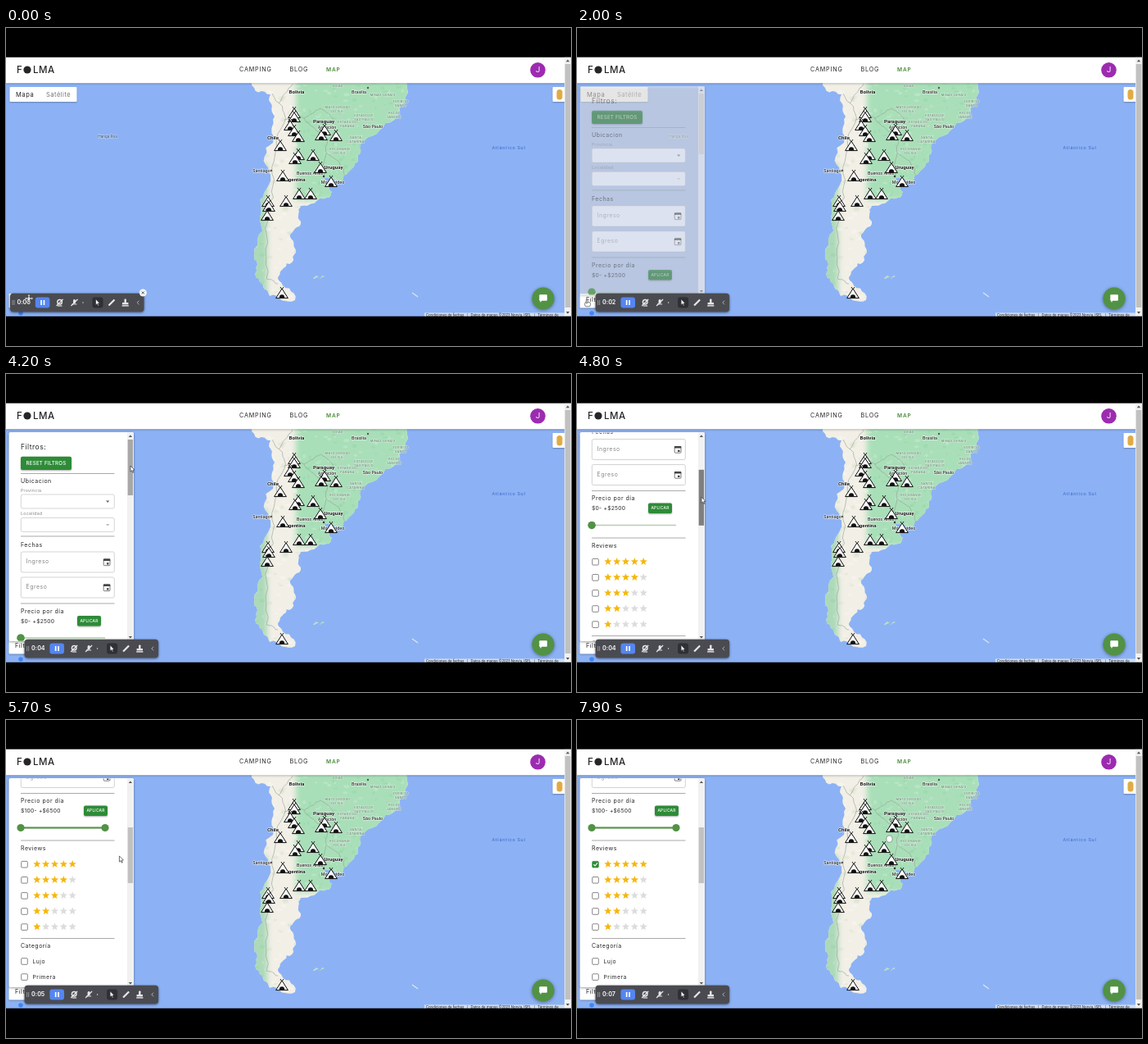
An HTML page with a canvas for the animation above (8000 ms loop, 690 by 388 pixels).

```html
<!DOCTYPE html>
<html lang="es">
<head>
<meta charset="utf-8">
<title>Mapa de campings</title>
<style>
html, body { margin: 0; width: 100%; height: 100%; overflow: hidden; background: #000; }
canvas { display: block; }
</style>
</head>
<body>
<canvas id="stage" width="690" height="388"></canvas>
<script>
const W = 690, H = 388, LOOP = 8000, TOP = 35.6, BOTTOM = 351.7;
const GREEN = '#2e8b37', LEAF = '#529245', INK = '#262626', GREY = '#858585';
const UI = 'Inter, sans-serif', MAP = 'Roboto, sans-serif';
const stage = document.getElementById('stage').getContext('2d');
let c = stage;
let seed = 11;
const random = () => (seed = seed * 16807 % 2147483647) / 2147483647;

// ---- drawing helpers ----
function rect(x, y, w, h, fill, r = 0, stroke) {
  c.beginPath();
  c.roundRect(x, y, w, h, r);
  if (fill) { c.fillStyle = fill; c.fill(); }
  if (stroke) { c.strokeStyle = stroke; c.lineWidth = 0.7; c.stroke(); }
}
function disc(x, y, r, fill, ry = r) {
  c.beginPath();
  c.ellipse(x, y, r, ry, 0, 0, 7);
  c.fillStyle = fill;
  c.fill();
}
function trace(points, close) {
  c.beginPath();
  for (let i = 0; i < points.length; i += 2) c.lineTo(points[i], points[i + 1]);
  if (close) c.closePath();
}
function poly(points, fill, stroke, width = 1) {
  trace(points, true);
  c.fillStyle = fill;
  c.fill();
  if (stroke) { c.strokeStyle = stroke; c.lineWidth = width; c.stroke(); }
}
function line(points, color, width = 1) {
  trace(points);
  c.strokeStyle = color;
  c.lineWidth = width;
  c.stroke();
}
function triangle(x, y, w, h, fill) {
  poly([x - w / 2, y, x + w / 2, y, x, y + h], fill);
}
function text(s, x, y, size, color, { weight = 400, gap = 0, align = 'left', font = UI, halo } = {}) {
  c.font = `${weight} ${size}px ${font}`;
  c.letterSpacing = gap + 'px';
  c.textAlign = align;
  c.textBaseline = 'middle';
  s.split('\n').forEach((row, i) => {
    const rowY = y + i * size * 1.25;
    if (halo) {
      c.strokeStyle = halo;
      c.lineWidth = 1.4;
      c.lineJoin = 'round';
      c.strokeText(row, x, rowY);
    }
    c.fillStyle = color;
    c.fillText(row, x, rowY);
  });
}
function scoped(draw) {
  c.save();
  draw();
  c.restore();
}
function at(x, y, draw) {
  scoped(() => { c.translate(x, y); draw(); });
}
function shadow(color, blur, draw) {
  scoped(() => {
    c.shadowColor = color;
    c.shadowBlur = blur;
    c.shadowOffsetY = 1;
    draw();
  });
}

// Eased progress of t from a to b, 0..1
function ease(t, a, b) {
  const k = Math.min(1, Math.max(0, (t - a) / (b - a)));
  return k * k * (3 - 2 * k);
}

// Splits every segment and nudges the midpoint sideways, for natural coasts and borders
function rough(points, rounds = 3, amount = 0.22) {
  for (; rounds > 0; rounds--) {
    const out = [];
    for (let i = 0; i < points.length - 2; i += 2) {
      const [x, y, nx, ny] = points.slice(i, i + 4), k = (random() - 0.5) * amount * 2;
      out.push(x, y, (x + nx) / 2 + (ny - y) * k, (y + ny) / 2 - (nx - x) * k);
    }
    points = out.concat(points.slice(-2));
  }
  return points;
}

// ---- map ----
const COAST = [300,66, 323,81, 328,108, 326,140, 320,176, 315,202, 310,235, 303,282, 310,310, 322,327,
  353,332, 333,308, 339,293, 354,274, 347,255, 360,236, 360,217, 392,207, 398,200, 388,184,
  410,188, 430,163, 438,137, 474,112, 489,66];
const REGIONS = [['GOIÁS', 405, 71], ['MINAS GERAIS', 460, 82], ['ESPÍRITO\nSANTO', 482, 90],
  ['MATO GROSSO\nDO SUL', 405, 97], ['ESTADO DE\nSÃO PAULO', 437, 107], ['RIO DE\nJANEIRO', 474, 104],
  ['ESTADO DO\nPARANÁ', 417, 115], ['SANTA\nCATARINA', 427, 134], ['RIO GRANDE\nDO SUL', 408, 148]];
const COUNTRIES = [['Bolivia', 355, 78], ['Paraguay', 388, 114], ['Chile', 326, 134],
  ['Uruguay', 400, 170], ['Argentina', 352, 185]];
const CITIES = [['Brasília', 431, 78], ['São Paulo', 448, 120], ['Asunción', 392, 121],
  ['Santiago', 312, 174], ['Buenos Aires', 371, 177], ['Montevideo', 399, 188]];
// Camp groups: first spot, then count and step
const CAMPS = [[352, 104, 2, 0, 5], [347, 119, 3, 5, 7], [335, 144], [389, 125, 2, -4, 6], [403, 132],
  [375, 156], [357, 155, 2, -4, 5], [384, 171], [338, 181], [397, 188], [358, 203, 2, 14, 0],
  [342, 212], [320, 212, 2, 1, 6], [319, 229], [337, 324]];

function tent(x, y) {
  at(x, y, () => {
    line([-2, -8, 0, -5, 2, -8], '#111', 0.9);
    poly([0, -6, 7.4, 5.6, -7.4, 5.6], '#fff', '#111', 1);
    c.beginPath();
    c.ellipse(0, 5.6, 3.3, 4.4, 0, Math.PI, 0);
    c.fillStyle = '#111';
    c.fill();
  });
}

function terrain() {
  c.save();
  trace(rough(COAST), true);
  c.fillStyle = '#f2efe6';
  c.fill();
  c.clip();
  c.filter = 'blur(3px)';
  rect(354, 60, 140, 150, '#a9dfb8');
  rect(290, 165, 29, 175, '#add9b8');
  c.filter = 'none';
  c.globalAlpha = 0.35;
  for (let i = 0; i < 420; i++) {
    const x = 300 + random() * 190, y = 66 + random() * 267;
    const green = (x > 356 && y < 208) || (x < 320 && y > 165);
    const shades = green ? ['#d3efd9', '#8ad3a0'] : ['#fbfaf5', '#cfdcc4'];
    disc(x, y, 0.8 + random() * 3, shades[i % 2], 0.6 + random() * 2);
  }
  c.globalAlpha = 1;
  const border = (points, color = '#93a096') => line(rough(points, 3, 0.15), color, 0.6);
  border([325,80, 340,115, 325,178, 320,235, 318,306, 332,312]);
  border([333,92, 350,68]);
  border([340,112, 364,110, 384,98, 401,115, 388,130, 364,110]);
  border([401,127, 391,152, 389,183]);
  border([391,152, 414,181]);
  border([391,108, 430,96, 482,98], '#bdd6c4');
  border([401,120, 441,122], '#bdd6c4');
  c.restore();
}

function drawMap() {
  rect(0, 67, W, 285, '#8cb2f5');
  terrain();
  for (const x of [378, 386]) poly(rough([x - 3, 305, x, 302, x + 4, 303, x - 3, 306]), '#c4e0c4');
  line([496, 323, 503, 328], '#dfe6ee', 1.2);
  disc(442, 73, 1.2, '#555');
  disc(324, 174, 1.2, '#555');
  disc(388, 181, 1.2, '#333');
  const center = { align: 'center', font: MAP };
  const labels = (list, size, color, style) =>
    list.forEach(([s, x, y]) => text(s, x, y, size, color, { ...center, ...style }));
  labels(REGIONS, 4.1, '#70817a', { gap: 0.25, halo: '#d5eedbaa' });
  labels(CITIES, 5.4, '#333', { weight: 500, halo: '#ffffffaa' });
  labels(COUNTRIES, 6.2, '#1d1d1d', { weight: 600, halo: '#ffffffaa' });
  text('Hanga Roa', 124, 132.5, 4.8, '#44536d', { ...center, halo: '#b8cff6' });
  text('Atlántico Sul', 614, 146, 5.6, '#3c68c4', { ...center, gap: 0.75 });
  for (const [x, y, n = 1, dx, dy] of CAMPS)
    for (let i = 0; i < n; i++) tent(x + (i && dx * i), y + (i && dy * i));
  disc(18, 348, 2.8, '#4285f4');
  rect(511, 347.5, 172, 5, '#e4e9f1cc');
  text('Condiciones de fechas   |   Datos de mapas ©2023 Norvia, ISEL   |   Términos de', 513, 350.3, 4.6, '#333', { font: MAP });
}

// ---- page chrome ----
function header() {
  shadow('#0006', 3, () => rect(0, TOP, W, 67.3 - TOP, '#fff'));
  const word = { weight: 500, gap: 0.5 };
  text('F', 13, 51.3, 11.5, INK, word);
  disc(26, 51, 4.6, INK);
  text('LMA', 33, 51.3, 11.5, INK, word);
  text('CAMPING', 285, 51.2, 7.2, INK, { gap: 0.85 });
  text('BLOG', 346.5, 51.2, 7.2, INK, { gap: 0.85 });
  text('MAP', 391, 51.2, 6.6, '#4b8a38', { weight: 600, gap: 0.8 });
  disc(649.5, 51.3, 9.3, '#9c2bb0');
  text('J', 649.5, 51.7, 9.5, '#fff', { align: 'center', font: MAP });
}

function controls() {
  shadow('#0004', 2, () => {
    rect(4.5, 72, 82, 18, '#fff', 1);
    rect(667.5, 72, 20, 18, '#fff', 1);
  });
  text('Mapa', 12, 81.3, 7.5, '#222', { gap: 0.6 });
  text('Satélite', 49, 81.3, 7.5, '#707070', { gap: 0.5 });
  rect(672.5, 75, 7, 12.5, '#e0ab45', 3.5);
  shadow('#0006', 4, () => disc(656, 330, 13.6, LEAF));
  rect(651.3, 325.3, 9.6, 7.4, '#fff', 1);
  triangle(653, 331, 3.4, 4, '#fff');
}

// Vertical scrollbar with arrows at both ends
function scrollbar(x, y, w, h, thumbY, thumbH, color) {
  rect(x, y, w, h, '#f1f1f1');
  rect(x + 0.7, thumbY, w - 1.4, thumbH, color);
  triangle(x + w / 2, y + 5.6, 4.4, -2.6, '#555');
  triangle(x + w / 2, y + h - 5.6, 4.4, 2.6, '#555');
}

function buildBase() {
  const canvas = document.createElement('canvas');
  canvas.width = W;
  canvas.height = H;
  c = canvas.getContext('2d');
  drawMap();
  header();
  controls();
  scrollbar(682, TOP, 8, BOTTOM - TOP, 44, 297, '#c1c1c1');
  rect(0, 0, W, TOP, '#000');
  rect(0, BOTTOM, W, H - BOTTOM, '#000');
  return canvas;
}
const base = buildBase();

// ---- filter panel ----
function rule(y) { line([18, y, 132.5, y], '#959595', 0.8); }
function heading(s, y) { text(s, 18, y, 7, INK, { gap: 0.5 }); }
function select(label, y, color) {
  text(label, 18, y - 13.3, 5.2, GREY, { gap: 0.3 });
  rect(18.3, y - 8.5, 114, 17, '#fff', 2, '#c4c4c4');
  triangle(124.2, y - 1, 4.4, 2.4, color);
}
function dateField(label, y) {
  rect(18.3, y - 12.5, 114, 25, '#fff', 2, '#c0c0c0');
  text(label, 24.5, y - 0.3, 6.9, GREY, { gap: 0.55 });
  rect(119.2, y - 3.6, 7.8, 7.8, null, 1, '#444');
  rect(119, y - 4, 8.2, 2.4, '#444');
  rect(123, y + 0.8, 2.5, 2.2, '#444');
}
function button(label, x, y, w, h, size) {
  shadow('#0005', 2, () => rect(x, y, w, h, GREEN, 2));
  text(label, x + w / 2, y + h / 2, size, '#fff', { weight: 500, align: 'center', gap: 0.2 });
}
function star(x, y, fill) {
  const points = [];
  for (let i = 0; i < 10; i++) {
    const a = i * Math.PI / 5 - Math.PI / 2, r = i % 2 ? 2.1 : 4.9;
    points.push(x + r * Math.cos(a), y + r * Math.sin(a));
  }
  poly(points, fill);
}
function checkbox(y, on) {
  rect(18.7, y - 3.8, 7.6, 7.6, on ? GREEN : '#fff', 1, on ? GREEN : '#555');
  if (on) line([20.3, y, 22, y + 1.8, 25, y - 1.8], '#fff', 1.1);
}

function content(t) {
  const loaded = t >= 5100;
  text('Filtros:', 18, 89.7, 8.5, INK, { gap: 0.5 });
  button('RESET FILTROS', 18, 100.7, 62, 16.3, 6.2);
  rule(121.5);
  heading('Ubicacion', 130.8);
  select('Provincia', 155.5, '#666');
  select('Localidad', 184, '#bbb');
  rule(198);
  heading('Fechas', 208.7);
  dateField('Ingreso', 229.5);
  dateField('Egreso', 260.5);
  rule(280);
  heading('Precio por día', 289.8);
  text(loaded ? '$100- +$6500' : '$0- +$2500', 18, 301.5, 6.7, INK, { gap: 0.25 });
  button('APLICAR', loaded ? 95 : 87, 295, 29, 12.5, 4.9);

  const high = 18 + 103 * ease(t, 5100, 5300);
  line([18, 322, 121, 322], '#b4d0b0', 1.5);
  line([18, 322, high, 322], LEAF, 2);
  disc(18, 322, 4.6, LEAF);
  disc(high, 322, 4.6, LEAF);

  rule(337.5);
  heading('Reviews', 347.8);
  for (let row = 0; row < 5; row++) {
    const y = 366.7 + row * 19.1;
    checkbox(y, row === 0 && t >= 6900);
    for (let i = 0; i < 5; i++) star(37.8 + i * 10.85, y - 0.3, i < 5 - row ? '#f5b60d' : '#dcdcdc');
  }
  rule(457);
  heading('Categoría', 466);
  ['Lujo', 'Primera', 'Segunda'].forEach((s, i) => {
    const y = 485 + i * 19.1;
    checkbox(y, false);
    text(s, 32.5, y, 6.8, INK, { gap: 0.5 });
  });
}

const scrollAt = t => 198 * ease(t, 4200, 5150) - 7.5 * ease(t, 5250, 5500);

function panel(t) {
  const scroll = scrollAt(t);
  c.save();
  c.globalAlpha = ease(t, 1850, 2150);
  shadow('#0006', 3, () => rect(3.5, 71, 152.5, 255, '#fff', 2));
  scoped(() => {
    c.beginPath();
    c.rect(3.5, 71.5, 144.5, 254);
    c.clip();
    at(0, -scroll, () => content(t));
  });
  const hovered = t > 3800 && t < 5500, dragged = hovered && t > 4250;
  scrollbar(148, 71.5, 7.8, 254, 80 + scroll * 0.268, t < 3700 ? 74 : 68,
    dragged ? '#7f7f7f' : hovered ? '#a8a8a8' : '#c1c1c1');
  c.restore();
}

// ---- recorder toolbar ----
function toolbar(t) {
  const pale = '#e8e8ea';
  at(5 + 13.5 * ease(t, 50, 900) + 4.1 * ease(t, 1100, 1400), 335, () => {
    shadow('#0008', 3, () => rect(0, -11.3, 163.5, 22.6, '#4a4b51', 4));
    for (const x of [3, 5]) line([x, -3, x, 3], '#999', 0.9);
    text('0:0' + Math.floor(t / 1000), 8.5, 0, 7.2, '#fff', { weight: 600 });
    rect(30.8, -6.5, 17.6, 13, '#5586f0', 3);
    for (const x of [37.2, 40.6]) rect(x, -3, 1.7, 6, '#fff');

    // camera and microphone, both struck out
    disc(60.6, -0.7, 3.5, pale);
    disc(60.6, -0.7, 2, '#4a4b51');
    line([58, 4, 63.5, 4], pale, 1.2);
    rect(77, -4, 3, 5.4, pale, 1.5);
    line([75.5, 2, 81.5, 2], pale, 0.9);
    for (const x of [60.6, 78.5]) line([x - 4, 4, x + 4, -4], pale, 1.2);
    disc(89, 0, 0.7, pale);

    // pointer, pen, stamp, collapse
    rect(100.5, -6.5, 13, 13, '#2f3035', 3);
    at(104.5, -4.2, () => CURSORS.arrow());
    line([120.5, 3.5, 127.5, -3.5], pale, 2.2);
    rect(139.5, -4.5, 2.4, 5, pale, 1);
    rect(137, 0, 7.4, 2.4, pale);
    rect(136.6, 3.2, 8.2, 1.4, pale);
    line([157.5, -2.3, 155.2, 0, 157.5, 2.3], '#bbb', 0.9);

    if (t < 1500) {
      disc(162.3, -12, 4.5, '#f4f4f4');
      for (const s of [-1.5, 1.5]) line([160.8, -12 - s, 163.8, -12 + s], '#444', 0.9);
    }
  });
}

// ---- mouse ----
const CURSORS = {
  move() {
    for (let i = 0; i < 4; i++) {
      c.rotate(Math.PI / 2);
      line([0, 0, 4, 0], '#fff', 1.2);
      poly([3, -1.9, 5.3, 0, 3, 1.9], '#fff', '#333', 0.5);
    }
  },
  arrow() {
    poly([0, 0, 0, 7.2, 1.7, 5.7, 2.9, 8.3, 4, 7.8, 2.9, 5.3, 5, 5.1], '#fff', '#333', 0.7);
  },
  pointer() {
    rect(-2.4, 3.4, 6.8, 5.4, '#fff', 2, '#444');
    rect(-0.8, 0, 1.8, 5, '#fff', 0.9, '#444');
  },
  grab() {
    rect(-3.5, -4, 7, 8.2, '#fff', 3, '#777');
  }
};

// Each move: start, end, destination
const MOVES = [[0, 900, 25.5, 334], [1250, 1800, 12, 331], [2350, 2850, 111, 120],
  [3300, 4000, 152, 112], [5500, 6500, 22.5, 174], [6950, 7850, 381.5, 145]];

function mouse(t) {
  let x = 28, y = 330;
  for (const [from, to, nx, ny] of MOVES) {
    const k = ease(t, from, to);
    x += (nx - x) * k;
    // while dragging, the pointer follows the scrollbar thumb
    if (from === 5500) y += scrollAt(t) * 0.278;
    y += (ny - y) * k;
  }
  let kind = 'arrow';
  if (t < 1400) kind = 'move';
  else if (t > 6950 && x > 157) kind = 'grab';
  else if ((t > 1700 && t < 2450) || (t > 6100 && t < 7100)) kind = 'pointer';
  at(x, y, CURSORS[kind]);
}

const start = performance.now();
function frame() {
  const t = (performance.now() - start) % LOOP;
  c = stage;
  c.drawImage(base, 0, 0);
  shadow('#0004', 2, () => rect(3.5, 324, 42, 17.5, '#fff', 1));
  text('Filtros', 11, 332, 7.3, INK, { gap: 0.5 });
  panel(t);
  toolbar(t);
  mouse(t);
  requestAnimationFrame(frame);
}
requestAnimationFrame(frame);
</script>
</body>
</html>
```
